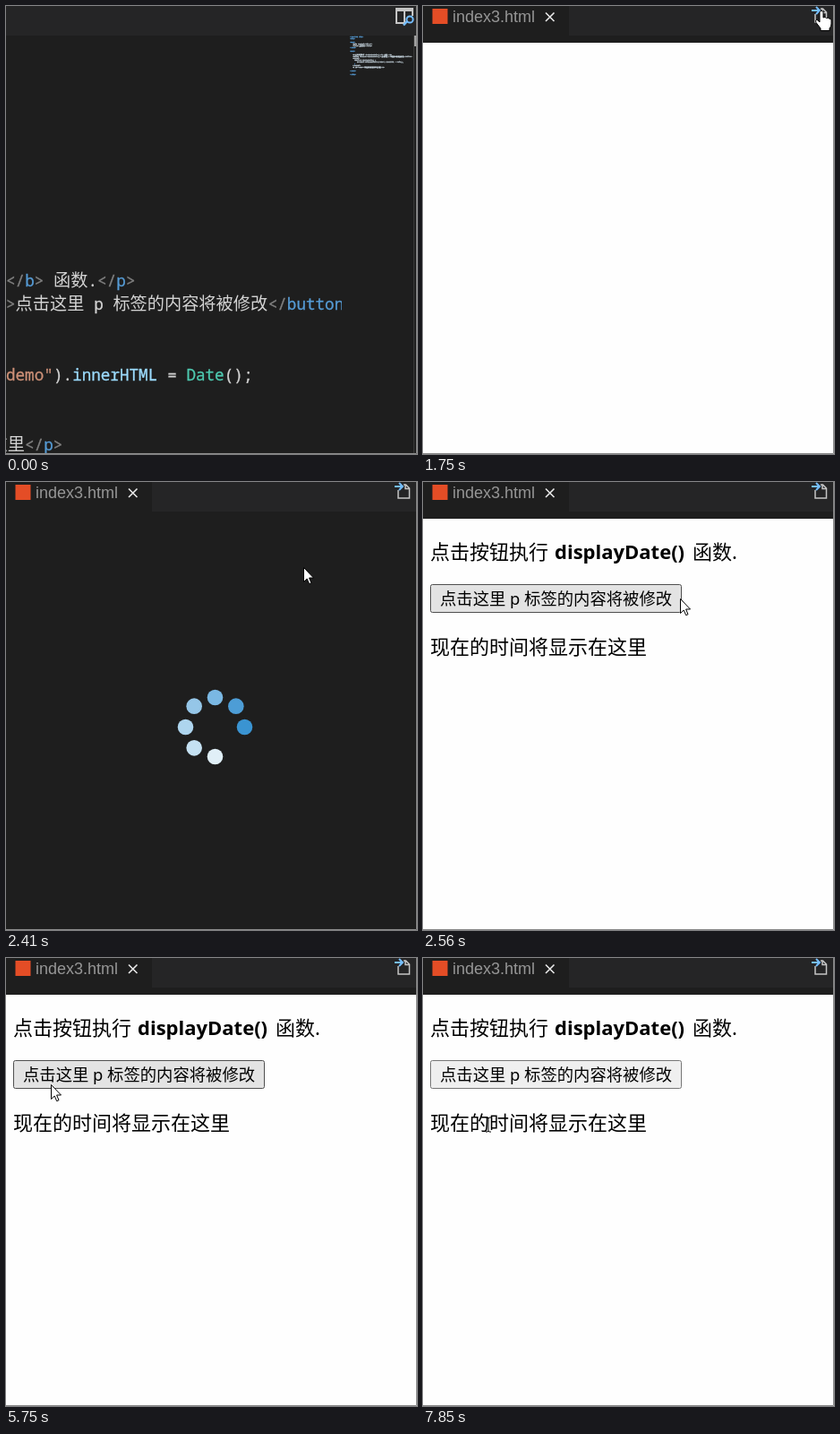
Recreate the animation shown at these times as an HTML page. Size 459 by 500 pixels, loop 8 s.

```html
<!DOCTYPE html>
<html lang="zh-CN">
<head>
<meta charset="utf-8">
<style>
  html, body { margin: 0; width: 100%; height: 100%; overflow: hidden; background: #1e1e1e; }
  svg { display: block; }
  text { white-space: pre; }
  .code { font: 17.6px "Noto Sans Mono", "Noto Sans CJK SC", monospace; stroke-width: .3; }
  .code .zh { font: 19.2px "Noto Sans CJK SC", "Noto Sans CJK JP", sans-serif; stroke: none; }
  .map { font: 1.7px "Noto Sans Mono", "Noto Sans CJK SC", monospace; stroke-width: .3; }
  .page { font: 22px "Noto Sans", "Noto Sans CJK SC", "Noto Sans CJK JP", sans-serif; }
  .tab { font: 18px "Liberation Sans", Arial, sans-serif; }
</style>
</head>
<body>
<svg width="459" height="500" viewBox="0 0 459 500">
  <defs>
    <clipPath id="codeArea"><rect width="375" height="500"/></clipPath>
  </defs>
  <rect width="459" height="500" fill="#1e1e1e"/>
  <rect width="459" height="33" fill="#252526"/>

  <g id="editor">
    <g id="lines" class="code" clip-path="url(#codeArea)"></g>
    <g id="map" class="map"></g>
    <g id="hover">
      <rect x="375" y="33" width="81" height="36" fill="#797979" opacity=".3"/>
      <rect x="456" y="33" width="3" height="217" fill="#4f4f4f"/>
      <rect y="491" width="327" height="8" fill="#797979" opacity=".4"/>
    </g>
    <path d="M455.5 33V499" stroke="#3a3a3a"/>
    <rect x="456" y="33" width="2" height="12" fill="#a0a0a0"/>
    <g fill="none" stroke="#c5c5c5" stroke-width="2">
      <path d="M436 20V3H454V11M445 4V19M435 19H445"/>
      <path d="M435 4H455" stroke-width="4"/>
      <path d="M448 17L444 21.500" stroke="#75beff" stroke-width="2.500"/>
      <circle cx="451" cy="15" r="3.600" fill="#252526" stroke="#75beff"/>
    </g>
  </g>

  <g id="preview">
    <rect width="163" height="33" fill="#1e1e1e"/>
    <rect x="10.500" y="3" width="17" height="17" fill="#e44d26"/>
    <text class="tab" x="33" y="18" fill="#969696">index3.html</text>
    <path d="M137 7.500L146.500 17M146.500 7.500L137 17" stroke="#e8e8e8" stroke-width="1.600"/>
    <path d="M438 9V18H450.500V7L446.500 3H444M446 3V7.500H450" fill="none" stroke="#c5c5c5" stroke-width="1.500"/>
    <path d="M434 5H442M439 1L443 5L439 9" fill="none" stroke="#75beff" stroke-width="2"/>
    <g id="spinner"></g>
    <rect id="blank" y="41" width="459" height="459" fill="#fefefe"/>
    <g id="page" class="page">
      <text x="8" y="86">点击按钮执行<tspan x="147" font-weight="700">displayDate()</tspan><tspan x="301">函数.</tspan></text>
      <rect id="button" x="8.500" y="114.500" width="280" height="31" rx="2"/>
      <text x="19" y="137" style="font-size:18.330px">点击这里 p 标签的内容将被修改</text>
      <text x="8" y="192">现在的时间将显示在这里</text>
    </g>
  </g>

  <path d="M458.500 0V499.500H0" fill="none" stroke="#8a8a8a"/>
  <g id="cursor">
    <path id="arrow" d="M.5 .5V16.500L4.200 13L6.700 18.700L9 17.700L6.600 12H11.500Z" fill="#fff" stroke="#000"/>
    <path id="beam" d="M-3 -8H-1L0 -7L1 -8H3M0 -7V7M-3 8H-1L0 7L1 8H3" fill="none" stroke="#000"/>
    <path id="hand" d="M-2 1.500Q0 -1.500 2 1.500V8Q4 6.500 5.500 8.500Q7.500 7.500 9 9.300Q11 8.500 11 11V15Q11 18 9 20V22.500H-1V20L-6 13.500Q-7.500 10.500 -5 10.300L-2 13Z" fill="#fff" stroke="#000"/>
  </g>
</svg>
<script>
const $ = id => document.getElementById(id);
const esc = s => s.replace(/&/g, "&amp;").replace(/</g, "&lt;");
const show = (id, on) => { $(id).style.display = on ? "" : "none"; };
const label = (s, x, y, color, cls = "") =>
  `<text class="${cls}" x="${x}" y="${y}" fill="${color}" stroke="${color}">${esc(s)}</text>`;

const GREY = "#808080", BLUE = "#569cd6", TEXT = "#d4d4d4";
const ADVANCE = 10.6, WIDE = 19.25;

// Each run is [text, colour]; Chinese runs use wide cells.
function codeLine(x, y, runs) {
  for (const [s, color] of runs) {
    const wide = s.charCodeAt(0) > 255;
    $("lines").innerHTML += label(s, x, y, color, wide ? "zh" : "");
    x += s.length * (wide ? WIDE : ADVANCE);
  }
}
const close = tag => [["</", GREY], [tag, BLUE]];
const end = [">", GREY];

codeLine(0, 313, [...close("b"), end, [" ", TEXT], ["函数", TEXT], [".", TEXT], ...close("p"), end]);
codeLine(0, 339, [end, ["点击这里", TEXT], [" p ", TEXT], ["标签的内容将被修改", TEXT], ...close("button")]);
codeLine(0, 418, [["demo\"", "#ce9178"], [").", TEXT], ["innerHTML", "#9cdcfe"], [" = ", TEXT], ["Date", "#4ec9b0"], ["();", TEXT]]);
codeLine(-17.5, 496, [["这里", TEXT], ...close("p"), end]);

const miniature = `<!DOCTYPE html>
<html>

<head>
   <meta charset="utf-8">
   <title>页面事件</title>
</head>

<body>

   <p>点击按钮执行 <b>displayDate()</b> 函数.</p>
   <button onclick="displayDate()">点击这里 p 标签的内容将被修改</button>
   <script>
     function displayDate() {
        document.getElementById("demo").innerHTML = Date();
     }
   <\/script>
   <p id="demo">现在的时间将显示在这里</p>

</body>

</html>`;
$("map").innerHTML = miniature.split("\n").map((s, i) =>
  label(s, 384, 35 + 2 * i, /^ +[fd<]/.test(s) ? "#c4d2dc" : BLUE)).join("");

const shades = ["#3a94d2", "#4d9dd6", "#7ab8e3", "#95c6e8", "#aed5ee", "#c5e1f2", "#e0eff7"];
$("spinner").innerHTML = shades.map((c, i) => {
  const a = -Math.PI / 2 - i * Math.PI / 4;
  return `<circle cx="${233.5 + 33 * Math.cos(a)}" cy="${273.5 + 33 * Math.sin(a)}" r="8.800" fill="${c}"/>`;
}).join("");

// Pointer path: [step, x, y]
const path = [
  [0, 345, 430], [2, 390, 210], [4, 434, 45], [5, 436, 15], [7, 443, 8], [10, 445, 5],
  [12, 440, 12], [13, 421, 25], [16, 287, 130], [18, 210, 112], [21, 90, 90], [23, 51, 85],
  [24, 27, 86], [26, 30, 86], [34, 296, 76], [35, 318, 74], [36, 322, 84],
  [38, 190, 116], [40, 50, 141], [42, 31, 135], [43, 34, 134], [50, 247, 132],
  [52, 225, 143], [54, 140, 172], [56, 73, 186]
];
function pointer(n) {
  const i = Math.max(1, path.findIndex(p => p[0] >= n));
  const [n0, x0, y0] = path[i - 1], [n1, x1, y1] = path[i];
  const k = (n - n0) / (n1 - n0);
  return [x0 + (x1 - x0) * k, y0 + (y1 - y0) * k];
}

function pointerKind(n, x, y) {
  if (y < 33) return "hand";
  if (n < 8) return x < 375 ? "beam" : "arrow";
  const onText = (y > 62 && y < 96 && x < 350) || (y > 168 && y < 198 && x < 250);
  return n >= 16 && onText ? "beam" : "arrow";
}

const LOOP = 8000, STEP = 133;
function draw(now) {
  const t = now % LOOP;
  const n = t < 400 ? -1 : Math.min(56, Math.floor((t - 375) / STEP));
  const loaded = n >= 16;
  show("editor", n < 8);
  show("hover", n >= 0);
  show("preview", n >= 8);
  show("spinner", n >= 12 && !loaded);
  show("blank", n < 12 || loaded);
  show("page", loaded);
  $("spinner").setAttribute("transform", `rotate(${(n - 13) * 45} 233.5 273.5)`);

  show("cursor", n >= 0);
  if (n >= 0) {
    const [x, y] = pointer(n);
    const kind = pointerKind(n, x, y);
    for (const id of ["arrow", "beam", "hand"]) show(id, id === kind);
    $("beam").setAttribute("stroke", n < 8 ? "#ddd" : "#000");
    $("cursor").setAttribute("transform", `translate(${Math.round(x)} ${Math.round(y)})`);
    const over = x >= 8 && x < 289 && y >= 114 && y < 146;
    $("button").setAttribute("fill", over ? "#e3e3e3" : "#efefef");
    $("button").setAttribute("stroke", over ? "#4f4f4f" : "#767676");
  }
  requestAnimationFrame(draw);
}
requestAnimationFrame(draw);
</script>
</body>
</html>
```
